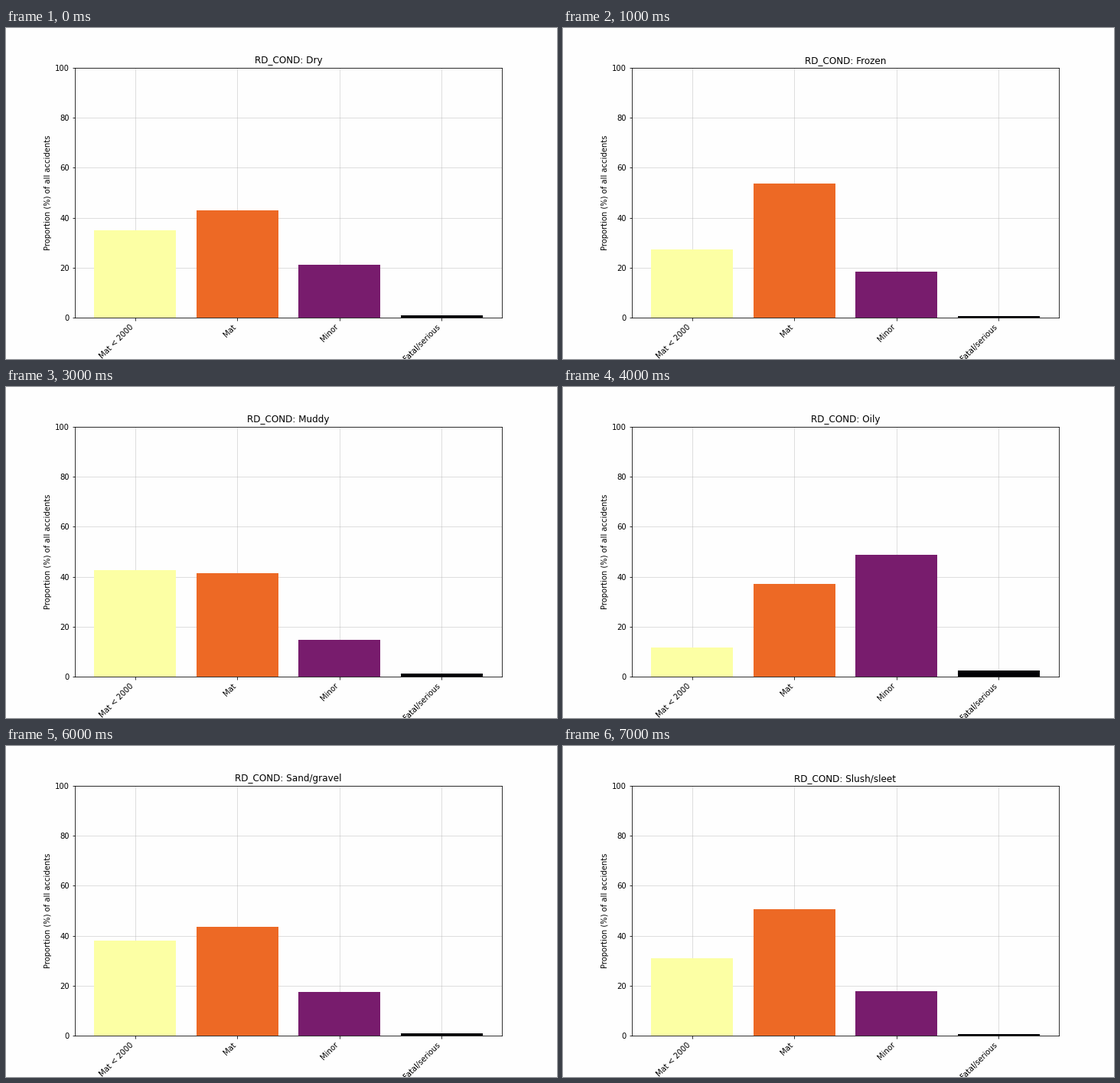
These frames come from a looping animation (720 px wide and 432 px high, 8000 ms). A matplotlib script:

```python
import numpy as np
import matplotlib.pyplot as plt
from matplotlib.animation import FuncAnimation

LABELS = ["Mat < 2000", "Mat", "Minor", "Fatal/serious"]
COLORS = plt.cm.inferno(np.linspace(1, 0, len(LABELS)))

# Share of accidents (%) per severity for each road condition
CONDITIONS = [
    ("Dry", [34.9, 42.9, 21.2, 1.0]),
    ("Frozen", [27.3, 53.7, 18.4, 0.6]),
    ("Icy", [42.6, 44.5, 12.6, 0.3]),
    ("Muddy", [42.6, 41.4, 14.7, 1.3]),
    ("Oily", [11.6, 37.2, 48.8, 2.4]),
    ("Other", [55.1, 37.3, 7.0, 0.6]),
    ("Sand/gravel", [38.0, 43.5, 17.5, 1.0]),
    ("Slush/sleet", [31.0, 50.6, 17.8, 0.6]),
]

plt.rcParams["font.family"] = "DejaVu Sans"
fig, ax = plt.subplots(figsize=(10, 6), dpi=72, facecolor="#fefefe")
fig.subplots_adjust(left=0.125, right=0.9, bottom=0.125, top=0.88)
ax.set_facecolor("#fefefe")
ax.set_axisbelow(True)
ax.grid(alpha=0.5)

bars = ax.bar(range(len(LABELS)), CONDITIONS[0][1], color=COLORS)
ax.set_xticks(range(len(LABELS)), LABELS, rotation=45, ha="right")
ax.set_xlim(-0.59, 3.59)
ax.set_ylim(0, 100)
ax.set_ylabel("Proportion (%) of all accidents")
title = ax.set_title("")


def update(i):
    name, shares = CONDITIONS[i]
    title.set_text(f"RD_COND: {name}")
    for bar, share in zip(bars, shares):
        bar.set_height(share)
    return [title, *bars]


anim = FuncAnimation(fig, update, frames=len(CONDITIONS), interval=1000,
                     repeat=True, repeat_delay=0, blit=False)
plt.show()
```
